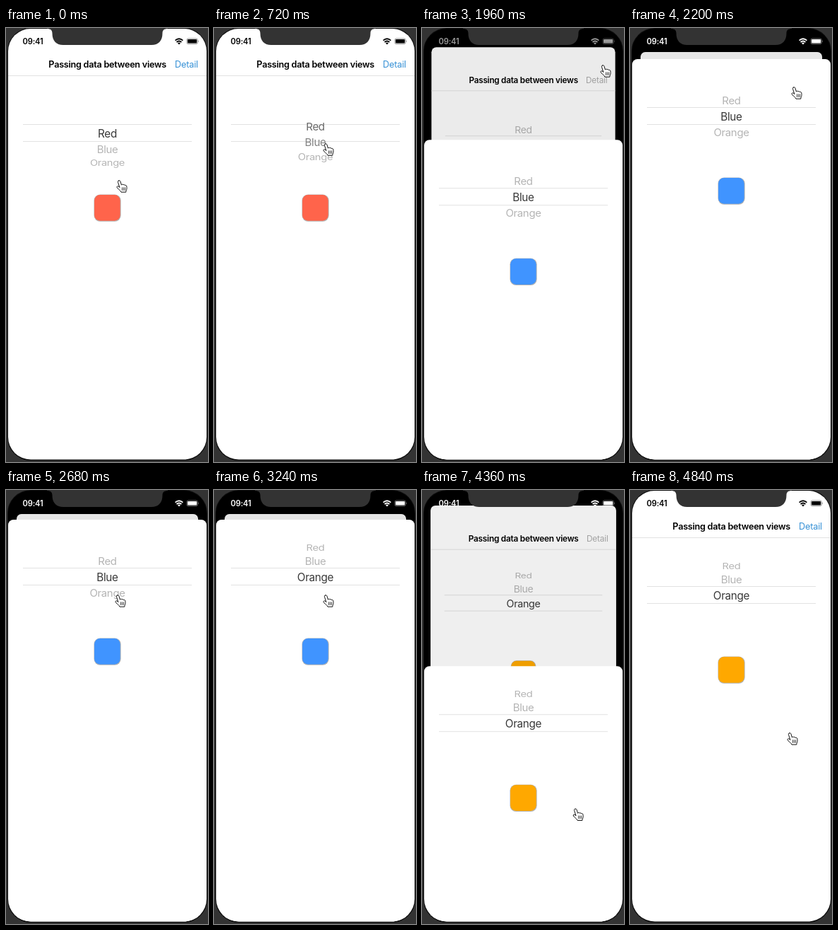
Recreate the animation shown at these times as an HTML page. Size 286 px wide and 614 px high, loop 5440 ms.

```html
<!DOCTYPE html>
<html lang="en">
<head>
<meta charset="utf-8">
<title>Passing data between views</title>
<style>
  html, body { margin: 0; width: 100%; height: 100%; overflow: hidden; background: #333; }
  svg { display: block; width: 286px; height: 614px; }
  text { font-family: Inter, Roboto, "Liberation Sans", sans-serif; text-anchor: middle; }
  .row { font-size: 15.3px; letter-spacing: -.35px; }
  .title { font-size: 12.7px; font-weight: 600; letter-spacing: -.28px; }
  .detail { font-size: 12.7px; letter-spacing: -.2px; }
  .clock { font-size: 11.2px; font-weight: 600; letter-spacing: -.2px; }
  .rule { stroke: #e2e2e2; stroke-width: 1; }
</style>
</head>
<body>
<svg viewBox="0 0 286 614">
  <defs>
    <clipPath id="screen"><rect x="3" y="1" width="281" height="609.5" rx="32"/></clipPath>
  </defs>
  <rect width="286" height="614" fill="#333"/>
  <rect x="2" y="0" width="283" height="612" rx="33" fill="#0c0c0c"/>
  <g clip-path="url(#screen)">
    <rect width="286" height="614" fill="#000"/>
    <g id="card">
      <rect x="3" y="1" width="281" height="640" rx="7.5" fill="#fff"/>
      <path class="rule" d="M3 67.5H284"/>
      <text class="title" x="143.7" y="55.5">Passing data between views</text>
      <text class="detail" id="detail" x="255.5" y="55.7">Detail</text>
      <g class="picker" transform="translate(143.5 148.5)"></g>
      <rect id="dim" x="3" y="1" width="281" height="640" rx="7.5" fill="#000"/>
    </g>
    <g id="sheet">
      <rect x="3" y="0" width="281" height="640" rx="7.5" fill="#fff"/>
      <g class="picker" transform="translate(143.5 80.5)"></g>
    </g>
    <g id="status">
      <text class="clock" x="38" y="22.8">09:41</text>
      <g fill="none" stroke="currentColor" stroke-width="1.8">
        <path d="M239.6 17.6Q245 12.9 250.4 17.6M241.6 20Q245 17 248.4 20"/>
      </g>
      <path d="M243 21.3Q245 19.8 247 21.3L245 23.4Z" fill="currentColor"/>
      <rect x="255.9" y="14.9" width="15.4" height="7.8" rx="2.3" fill="none" stroke="currentColor" stroke-width=".8" opacity=".5"/>
      <rect x="257" y="16" width="13.2" height="5.6" rx="1.3" fill="currentColor"/>
      <path d="M272.2 17.3q1.3 1.5 0 3z" fill="currentColor" opacity=".6"/>
    </g>
  </g>
  <path fill="#333" d="M58 0H229V1C224 1 221.5 3 221.5 7.5C221.5 18 216 24 206 24H81C71 24 65.5 18 65.5 7.5C65.5 3 63 1 58 1Z"/>
  <g id="hand" stroke="#111" stroke-width="1" stroke-linejoin="round" stroke-linecap="round">
    <path fill="#fff" d="M3.2 1.2C4.4 .2 5.6 .8 6 2.2L7.4 7C8 6 9.6 5.8 10 7C10.8 6.2 12 6.4 12.3 7.6C13.2 7 14.6 7.4 14.8 8.8C15.2 11 15.2 13 14 15.5L13.8 17.2H7C6 15 4 13.5 2 11.8C.4 10.4 1 8.6 2.6 8.8C3.6 9 4.2 9.8 4.9 10.6L2.5 3.2C2.2 2.2 2.4 1.6 3.2 1.2Z"/>
    <path fill="none" stroke-width=".8" d="M8.5 10.8V14.5M10.5 10.8V14.5M12.5 10.8V14.5"/>
  </g>
</svg>
<script>
const LOOP = 5440, STEP = 40;
const REST = 42, HIDDEN = 610;
const WHEEL_R = 61.5, WHEEL_ANGLE = 0.37;
const NAMES = ['Red', 'Blue', 'Orange'];
const COLORS = ['#ff644b', '#4094ff', '#ffa800'];

// Pointer path: time, x, y
const PATH = [
  [0, 164, 224], [360, 162, 172], [880, 162, 172], [1160, 200, 141],
  [1320, 232, 84], [1640, 260, 61], [1960, 260, 61], [2200, 236, 92],
  [2360, 197, 134], [2680, 162, 157], [3240, 162, 157], [3560, 223, 242],
  [3880, 223, 242], [4440, 221, 472], [4840, 230, 352], [LOOP, 230, 352]
];

const byId = id => document.getElementById(id);
const clamp = v => Math.min(1, Math.max(0, v));
const ramp = (t, a, b) => clamp((t - a) / (b - a));
const smooth = u => u * u * (3 - 2 * u);
const mix = (a, b, u) => a + (b - a) * u;
const rgb = (a, b, u) => `rgb(${a.map((v, i) => Math.round(mix(v, b[i], u)))})`;

function slope(i, axis) {
  const a = PATH[i], b = PATH[i + 1];
  return a && b ? (b[axis] - a[axis]) / (b[0] - a[0]) : 0;
}

function tangent(i, axis) {
  const m = slope(i - 1, axis), n = slope(i, axis);
  return m * n > 0 ? 2 * m * n / (m + n) : 0;
}

// Monotone cubic through the path points
function pointer(t, axis) {
  let i = 0;
  while (i < PATH.length - 2 && t >= PATH[i + 1][0]) i++;
  const a = PATH[i], b = PATH[i + 1], h = b[0] - a[0], u = (t - a[0]) / h;
  return mix(a[axis], b[axis], smooth(u))
    + h * u * (1 - u) * ((1 - u) * tangent(i, axis) - u * tangent(i + 1, axis));
}

// Remaining share of a critically damped spring
function spring(t, start, speed) {
  const x = Math.max(0, t - start) * speed;
  return (1 + x) * Math.exp(-x);
}

const dragTop = t => REST + Math.max(0, pointer(t, 2) - 252);

function sheetTop(t) {
  if (t < 1840 || t >= 4840) return HIDDEN;
  if (t < 3880) return mix(REST, HIDDEN, spring(t, 1814, 0.0203));
  if (t <= 4440) return dragTop(t);
  return mix(HIDDEN, dragTop(4440), spring(t, 4455, 0.021));
}

const scroll = t => smooth(ramp(t, 600, 860)) + smooth(ramp(t, 3000, 3240));
const picked = t => (t >= 920) + (t >= 3320);

const pickers = [...document.querySelectorAll('.picker')].map(g => {
  g.innerHTML = '<path class="rule" d="M-119.5 -12H119.5M-119.5 12H119.5"/>'
    + NAMES.map(n => `<text class="row" y="6.2">${n}</text>`).join('')
    + '<rect x="-19" y="87" width="38.2" height="38.2" rx="8.6" fill="#000" opacity=".3"/>'
    + '<rect class="chip" x="-18.4" y="87.6" width="36.6" height="36.6" rx="8"/>';
  return { rows: g.querySelectorAll('.row'), chip: g.querySelector('.chip') };
});

function drawPicker({ rows, chip }, t) {
  const pos = scroll(t);
  rows.forEach((row, i) => {
    const k = i - pos, d = Math.abs(k), a = k * WHEEL_ANGLE;
    row.setAttribute('transform',
      `translate(0 ${WHEEL_R * Math.sin(a)}) scale(${1 - 0.02 * d} ${Math.cos(a)})`);
    row.setAttribute('fill', rgb([56, 56, 56], [180, 180, 180], ramp(d, 0.2, 0.8)));
  });
  chip.setAttribute('fill', COLORS[picked(t)]);
}

function draw(t) {
  const top = sheetTop(t);
  const p = clamp(1 - (top - REST) / (HIDDEN - REST));
  // The card shrinks ahead of its downward shift
  const scale = 1 - 0.085 * Math.pow(p, 0.6);
  byId('card').setAttribute('transform',
    `translate(143.5 ${1 + 33 * p}) scale(${scale}) translate(-143.5 -1)`);
  byId('dim').setAttribute('opacity', 0.1 * p);
  byId('detail').setAttribute('fill', rgb([54, 145, 214], [172, 172, 172], ramp(p, 0, 0.6)));
  byId('sheet').setAttribute('transform', `translate(0 ${top})`);
  byId('sheet').setAttribute('visibility', top < HIDDEN ? 'visible' : 'hidden');

  const light = ramp(t, 1840, 2040) - ramp(t, 4480, 4680);
  const ink = rgb([0, 0, 0], [255, 255, 255], light);
  byId('status').setAttribute('color', ink);
  byId('status').setAttribute('fill', ink);

  pickers.forEach(g => drawPicker(g, t));
  byId('hand').setAttribute('transform',
    `translate(${pointer(t, 1) - 8} ${pointer(t, 2) - 9})`);
}

const begin = performance.now();
function tick() {
  const t = (performance.now() - begin) % LOOP;
  draw(Math.floor(t / STEP) * STEP);
  requestAnimationFrame(tick);
}
tick();
</script>
</body>
</html>
```
